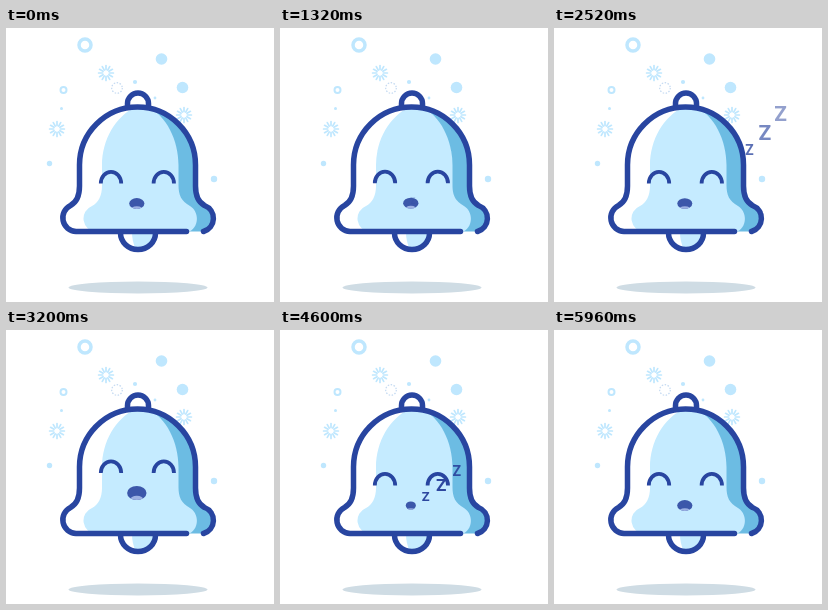
Animation, 268 px wide and 274 px high, one loop 6 s. Source, as an HTML page:

```html
<!DOCTYPE html>
<html lang="en">
<head>
<meta charset="utf-8">
<title>Sleeping bell</title>
<style>
  html, body { margin: 0; width: 100%; height: 100%; overflow: hidden; background: #fff; }
  svg { display: block; width: 100vw; height: 100vh; }
  text { font: bold 14px Roboto, "Liberation Sans", sans-serif; text-anchor: middle; fill: #2d479f; }
</style>
</head>
<body>
<svg viewBox="0 0 268 274" xmlns="http://www.w3.org/2000/svg">
  <defs>
    <path id="bell" d="M180.500 203.500H70A13.700 13.700 0 0 1 64.500 177.500C71 174 73.500 168 73.500 158V137A58 58 0 0 1 189.500 137V158C189.500 168 192 174 198.500 177.500A13.700 13.700 0 0 1 197.500 203.500"/>
    <clipPath id="bellClip"><use href="#bell"/></clipPath>
    <clipPath id="mouthClip"><ellipse class="mouth" cx="130.800"/></clipPath>
  </defs>
  <ellipse cx="132" cy="259.500" rx="69.500" ry="6" fill="#cfdce4"/>
  <g id="decor" fill="#bfe7fe" stroke="#bfe7fe" stroke-width="0"></g>
  <path fill="#fff" d="M114.500 204A17.500 17.500 0 0 0 149.500 204Z"/>
  <path fill="#c5ebff" d="M126 204H149.500A17.500 17.500 0 0 1 130 221.500Q126 214 126 204Z"/>
  <g clip-path="url(#bellClip)">
    <path fill="#fff" d="M50 75H215V206H50Z"/>
    <path fill="#6cbce3" d="M132 75H215V204H132Z"/>
    <path fill="#c5ebff" d="M135 77C112 84 96 110 96 137V158C96 168 92 175 86 178A13.500 13.500 0 0 0 90 204H181C192 202 195 185 184 178C175 173 172.500 167 172.500 157V137C172.500 110 158 82 135 77Z"/>
  </g>
  <g fill="none" stroke="#2845a0" stroke-width="5.500" stroke-linecap="round">
    <path d="M121.500 77V75.500A10.500 10.500 0 0 1 142.500 75.500V77" fill="#fff"/>
    <path d="M114.500 205A17.500 16.500 0 0 0 149.500 205"/>
    <use href="#bell"/>
    <path id="eyes" stroke-width="3.800" stroke-linecap="butt" d="M94.800 155.500A10.200 11.600 0 0 1 115.200 155.500M147.600 155.500A10.200 11.600 0 0 1 168 155.500"/>
  </g>
  <ellipse class="mouth" cx="130.800" fill="#3c57aa"/>
  <g clip-path="url(#mouthClip)"><ellipse id="tongue" cx="130.800" rx="6.800" ry="4.500" fill="#9db1e3"/></g>
  <g id="snore"></g>
</svg>
<script>
const LOOP = 6000, STEP = 40;
const BREATH = 2600, SNORE = 2720;
const DRIFT = 1400;
const $ = id => document.getElementById(id);

function set(el, attrs) {
  for (const name in attrs) el.setAttribute(name, attrs[name]);
}
function add(parent, tag, attrs = {}) {
  const el = document.createElementNS('http://www.w3.org/2000/svg', tag);
  set(el, attrs);
  return parent.appendChild(el);
}

function dot(cx, cy, r) {
  add($('decor'), 'circle', { cx, cy, r });
}
function ring(cx, cy, r, width, more) {
  add($('decor'), 'circle', { cx, cy, r, fill: 'none', 'stroke-width': width, ...more });
}
function burst(cx, cy) {
  for (let angle = 0; angle < 360; angle += 30) {
    add($('decor'), 'path', {
      d: 'M3.400 0H7.400', 'stroke-width': 1.7, 'stroke-linecap': 'round',
      transform: `translate(${cx} ${cy}) rotate(${angle})`
    });
  }
}

ring(79, 17, 6, 3.5);
ring(57.5, 62, 3, 2);
ring(111, 60, 5.3, 1.2, { stroke: '#c3d9f1', 'stroke-dasharray': '1.500 1.500' });
burst(100, 45);
burst(51, 101);
burst(178, 87);
dot(155.5, 31, 5.8);
dot(176.5, 59.5, 5.8);
dot(208, 151, 3.2);
dot(43.5, 135.5, 2.7);
dot(129, 54, 2.1);
dot(55.5, 80.5, 1.5);
dot(149, 70, 1.4);

const clamp = x => Math.min(1, Math.max(0, x));
const smooth = x => x * x * (3 - 2 * x);

// Rises from 0 to 1 at the peak, then falls back to 0.
function bump(t, start, peak, end) {
  return smooth(clamp(t < peak ? (t - start) / (peak - start) : (end - t) / (end - peak)));
}

const letters = [10, 16, 13].map((size, i) => {
  const el = add($('snore'), 'text');
  el.textContent = 'Z';
  return { el, size, growth: 10.5 - 4.5 * i, start: 1280 + 200 * i };
});

function drawFace(t) {
  const u = t < 2 * BREATH ? t % BREATH : 0;
  const yawn = bump(u, 0, 620, 1400);
  const exhale = bump(u, 1300, 1950, 2600);
  const cy = 175.5 - 12.5 * yawn;
  const rx = 7.6 + 2.1 * yawn - 2.6 * exhale;
  const ry = 5.4 + 1.6 * yawn - 1.3 * exhale;
  set($('eyes'), { transform: `translate(0 ${-12.5 * yawn})` });
  document.querySelectorAll('.mouth').forEach(el => set(el, { cy, rx, ry }));
  set($('tongue'), { cy: cy + 7.2 });
}

function drawSnore(t) {
  for (const { el, size, growth, start } of letters) {
    const k = t < start ? 0 : (t - start) % SNORE / DRIFT;
    const font = size + growth * (k * 1.4 - 0.2);
    const fade = clamp(1.35 - 0.95 * k) * clamp(7 * k) * clamp(12 * (1 - k));
    set(el, { x: 130 + 109 * k, y: 174 - 105 * k ** 1.38 + font * 0.355, opacity: fade });
    el.style.fontSize = font + 'px';
  }
}

const began = performance.now();
function tick() {
  const t = Math.floor((performance.now() - began) % LOOP / STEP) * STEP;
  drawFace(t);
  drawSnore(t);
  requestAnimationFrame(tick);
}
tick();
</script>
</body>
</html>
```
